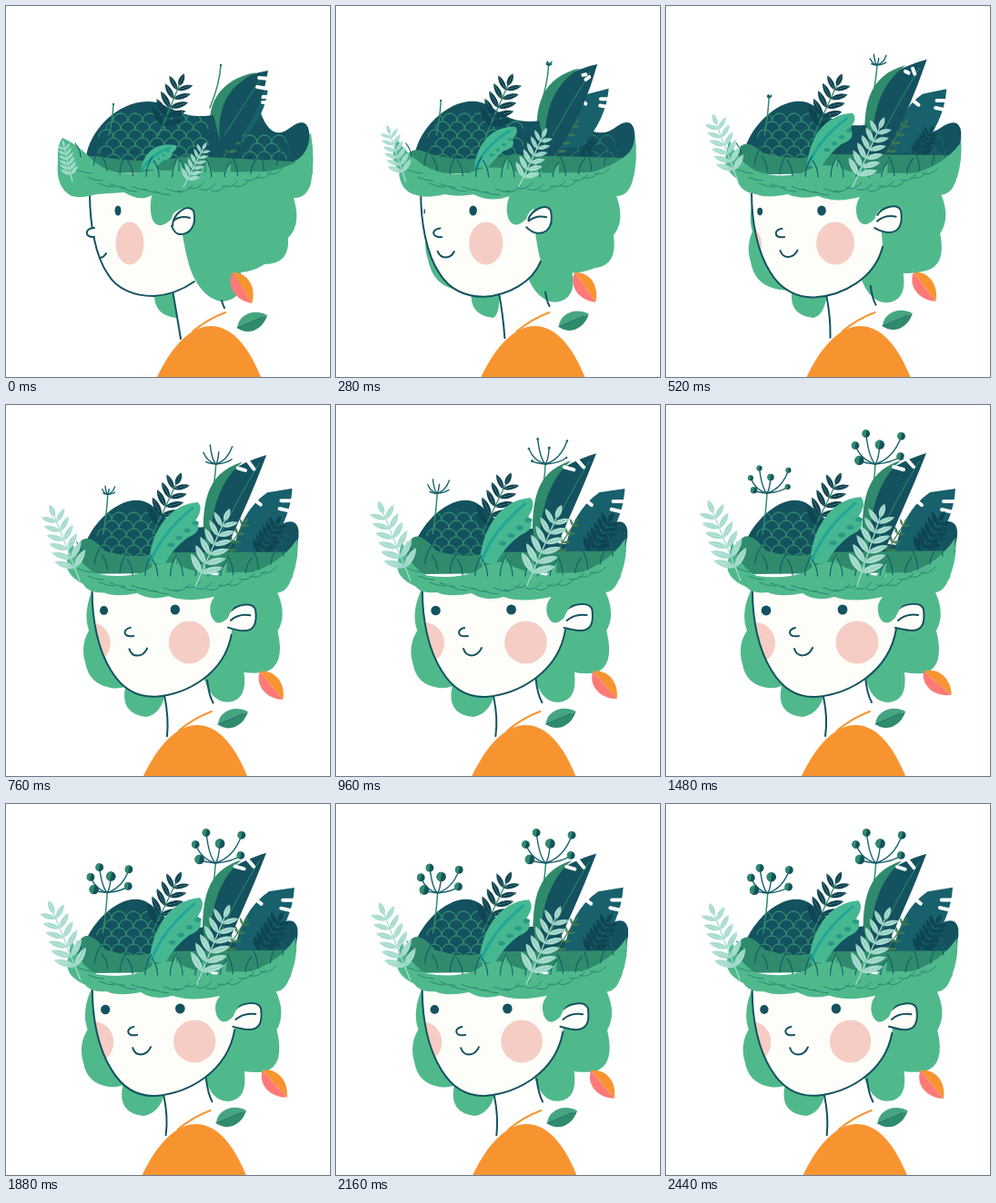
Recreate the animation shown at these times as an HTML page with a canvas. Size 356x408 px, loop 2480 ms.

```html
<!DOCTYPE html>
<html lang="en">
<head>
<meta charset="utf-8">
<title>Garden hair</title>
<style>
html, body { margin: 0; width: 100%; height: 100%; overflow: hidden; background: #fff; }
canvas { display: block; }
</style>
</head>
<body>
<canvas id="stage" width="356" height="408"></canvas>
<script>
const ctx = document.getElementById('stage').getContext('2d');
const LOOP = 2480, STEP = 40;
const HAIR = '#50b98c', MID = '#2f8b6c', DARK = '#14525f', DEEP = '#0f4450', TEAL = '#17606c',
  PALE = '#a8dccf', SKIN = '#fdfdf9', BLUSH = '#f5cdc4', ORANGE = '#f79430';
const NUMBER = /-?[\d.]+/g;
let time = 0, turn = 0, gust = 0;

function ramp(start, end) {
  const x = Math.min(1, Math.max(0, (time - start) / (end - start)));
  return x * x * (3 - 2 * x);
}

// Blend from the profile pose to the facing pose
const mix = (a, b) => a + (b - a) * turn;
function morph(a, b) {
  const target = b.match(NUMBER);
  let i = 0;
  return new Path2D(a.replace(NUMBER, n => mix(+n, +target[i++])));
}

function fill(path, color) { ctx.fillStyle = color; ctx.fill(path); }
function line(path, color = DARK, width = 2) {
  ctx.strokeStyle = color;
  ctx.lineWidth = width;
  ctx.stroke(path);
}
function clipped(path, draw) {
  ctx.save();
  ctx.clip(path);
  draw();
  ctx.restore();
}
function ellipse(x, y, rx, ry, color) {
  const p = new Path2D();
  p.ellipse(x, y, Math.max(0, rx), Math.max(0, ry), 0, 0, 7);
  fill(p, color);
}
function curve(x0, y0, cx, cy, x1, y1, color, width) {
  line(new Path2D(`M${x0} ${y0}Q${cx} ${cy} ${x1} ${y1}`), color, width);
}

function petal(x, y, angle, len, width, color, lower = color) {
  ctx.save();
  ctx.translate(x, y);
  ctx.rotate(angle);
  for (const [side, c] of [[-width, color], [width, lower]])
    fill(new Path2D(`M0 0C${len * .2} ${side} ${len * .7} ${side} ${len} 0Z`), c);
  ctx.restore();
}

function fern(bx, by, tx, ty, pairs, len, color, stem = color) {
  const dir = Math.atan2(ty - by, tx - bx);
  curve(bx, by, (bx + tx) / 2, (by + ty) / 2, tx, ty, stem, 1.3);
  for (let i = 0; i < pairs; i++) {
    const s = .2 + .72 * i / (pairs - 1), size = len * (1.1 - .35 * s);
    for (const side of [-.9, .9])
      petal(bx + (tx - bx) * s, by + (ty - by) * s, dir + side, size, size * .2, color);
  }
  petal(tx, ty, dir, len * .65, len * .17, color);
}

// Six stalks fan out from the hub, then the berries swell
const REACH = [18, 30, 35, 22, 42, 29];
function umbel(hx, hy, bx, by, scale, start) {
  const spread = scale * ramp(start, start + 1300), radius = 5 * ramp(start + 650, start + 1550);
  curve(bx, by, hx - 1, hy + 20, hx, hy, MID, 1.5);
  const tips = REACH.map((reach, i) => {
    const angle = (30 * i - 167) * Math.PI / 180;
    return [Math.cos(angle) * reach * spread, Math.sin(angle) * reach * spread];
  });
  for (const [dx, dy] of tips)
    curve(hx, hy, hx + dx * .7, hy + dy * .2, hx + dx, hy + dy, TEAL, 1.4);
  tips.forEach(([dx, dy], i) => {
    const size = radius * (i % 3 ? .87 : 1.05);
    ellipse(hx + dx, hy + dy, size, size, DARK);
    const half = new Path2D();
    half.arc(hx + dx, hy + dy, size, 1.8, 4.9);
    fill(half, MID);
  });
}

function scallops(path, x0, x1, y0) {
  clipped(path, () => {
    for (let row = 0; row < 6; row++)
      for (let x = x0 + row % 2 * 8; x < x1; x += 16) {
        const p = new Path2D();
        p.arc(x, y0 + row * 9, 8, Math.PI, 0);
        line(p, MID, 1.3);
      }
  });
}

function drawBody() {
  fill(morph(
    'M105 200Q107 228 107 248Q107 265 112 275Q117 300 135 310Q150 318 163 316Q162 340 187 343Q188 340 183 312L170 300L120 250Z',
    'M95 200Q81 228 89 248Q78 265 84 285Q88 308 112 311Q120 312 127 309Q120 340 150 343Q168 340 174 318L170 300L120 250Z'), HAIR);
  fill(morph('M183 300L183 313Q187 335 192 366L240 366L240 332L237 300Z',
    'M173 300L173 321Q178 345 175 364L226 364L226 327L219 300Z'), '#fff');
  line(morph('M183 313Q187 335 192 366', 'M173 321Q178 345 175 364'));
  ctx.save();
  ctx.translate(mix(0, -17), 0);
  fill(new Path2D('M166 408C181 376 202 352 225 352C249 352 267 376 280 408Z'), ORANGE);
  curve(205, 358, 222, 344, 241, 337, ORANGE, 2);
  ctx.restore();
}

function drawFace() {
  fill(morph(
    'M192 180L335 140Q340 170 335 195Q330 212 316 211Q325 240 310 255Q312 284 284 284Q272 292 258 293Q264 322 238 325Q208 322 194 262Q192 250 190 240Z',
    'M240 180L318 140Q321 168 311 190Q306 205 296 206Q307 230 297 248Q307 288 284 295Q272 296 262 294Q266 325 245 327Q226 328 219 300Q245 280 252 240Z'), HAIR);
  line(morph('M237 324Q238 328 240 332', 'M219 300Q221 318 226 327'));

  const outline = [
    'M92 205C92 240 98 275 112 295C122 312 142 319 162 319C182 318 197 310 207 303',
    'M95 205C95 235 101 268 116 292C128 312 145 322 165 321C200 318 245 295 253 246'];
  const face = morph(outline[0] + 'Q195 270 192 235L200 190L92 190Z',
    outline[1] + 'Q256 235 257 222L240 190L95 190Z');
  fill(face, SKIN);
  clipped(face, () => {
    ellipse(mix(52, 98), 262, 22, 23, BLUSH);
    line(morph('M93 271C97 279 106 279 110 272', 'M141 268C144 278 156 278 161 267'));
  });
  ellipse(mix(136, 210), 261, mix(15.5, 23.5), 23.5, BLUSH);
  line(morph(...outline));

  const nose = morph('M97 244C86 244 86 255 97 254', 'M142 245C133 247 134 256 146 254');
  fill(nose, SKIN);
  line(nose);
  ellipse(mix(89, 110), 226, mix(-2.2, 5.4), mix(1.5, 5.4), DARK);
  ellipse(mix(123, 194), 225, mix(3.5, 5.4), 5.5, DARK);

  const ear = morph('M183 242C183 230 198 216 206 225C210 240 203 252 190 251C186 250 184 247 182 242',
    'M256 224C262 219 280 215 283 225C285 241 281 248 270 248C264 248 257 246 252 245');
  fill(ear, SKIN);
  line(ear);
  line(morph('M184 236Q192 230 202 233', 'M255 237Q264 229 277 231'));
}

function drawFoliage() {
  umbel(mix(236, 230), 65, 224, 112, 1, 0);

  const mound = morph('M215 175L232 112L280 118Q292 150 312 134Q330 120 333 138Q336 170 300 176Z',
    'M212 175L222 150L262 155Q290 140 303 130Q318 124 320 138Q322 165 290 175Z');
  fill(mound, DARK);
  ctx.globalAlpha = 1 - turn;
  scallops(mound, mix(268, 262), 302, 150);
  ctx.globalAlpha = 1;

  fill(morph('M240 150Q245 110 265 98L288 90Q285 120 262 145Z', 'M250 168Q258 118 290 96L318 92Q316 130 285 168Z'), TEAL);
  line(morph('M288 100L282 100M286 106L282 106M268 104L270 106',
    'M320 106L305 106M316 118L303 115M272 103L281 110'), '#fff', 4);
  fern(238, 168, 262, 130, 4, 11, '#3f7a4f');
  fern(mix(268, 275), 172, mix(268, 300), mix(165, 128), 6, mix(2, 20), DEEP);

  fill(morph('M228 150C215 110 235 80 288 71L284 90Q270 135 245 160Z',
    'M216 165C215 110 215 75 286 53L273 85Q258 120 238 165Z'), DARK);
  fill(morph('M228 150C215 110 235 80 275 73C240 90 232 115 235 150Z',
    'M216 165C215 110 215 75 258 61C227 88 224 130 222 165Z'), MID);
  line(morph('M240 142Q262 108 280 80', 'M234 145Q252 105 278 62'), MID, 1);
  line(morph('M290 80L278 79M288 91L276 89', 'M250 68L261 71M263 58L272 68'), '#fff', 4);

  const bush = morph('M88 168C90 135 130 98 165 106C185 112 195 125 228 120L240 170Q160 185 88 168Z',
    'M84 160C92 130 125 98 150 106C168 112 175 140 216 136L220 170Q130 176 84 160Z');
  fill(bush, DARK);
  scallops(bush, mix(110, 108), mix(220, 162), 126);
  fern(mix(168, 160), 142, mix(190, 186), 88, 5, 23, DEEP, MID);
  umbel(mix(118, 111), mix(108, 97), mix(113, 106), 142, .83, 260);

  fill(morph('M75 180Q75 165 100 165Q150 175 200 165L335 172L310 182L95 184Z',
    'M74 175Q80 122 110 160Q140 170 168 162L318 160L290 184L95 186Z'), MID);
  fill(morph('M148 180C152 160 165 150 186 153Q190 156 182 162Q184 168 172 170Q166 176 162 180Z',
    'M158 174C160 140 178 104 214 101Q221 108 212 122Q222 135 203 143Q186 155 176 174Z'), '#45b892');
  line(morph('M149 180Q160 163 180 156', 'M160 172Q172 138 208 108'), '#22a69a', 3);
  for (let s = .25; s <= 1; s += .25)
    ellipse(mix(158, 174) + s * mix(20, 38), mix(176, 160) - s * mix(16, 34), mix(1.5, 4), mix(1.2, 2.6), '#2a9a86');
}

function drawGround() {
  fill(morph(
    'M62 145Q75 150 92 166Q110 186 140 184Q165 178 190 182Q230 192 270 184Q310 182 336 160L337 185Q300 195 255 192L195 222Q182 226 182 234Q168 248 161 235Q157 225 160 208Q148 216 130 205Q112 206 100 207Q82 212 72 209Q54 200 57 170Q56 152 62 145Z',
    'M73 146Q76 175 100 188Q130 192 152 184Q178 165 195 178Q215 186 245 190Q295 182 318 146L312 190Q300 205 285 212L262 218Q256 224 252 234Q240 246 234 232Q230 220 238 211Q205 218 185 211Q165 217 150 207Q125 212 112 206Q95 208 88 200Q64 190 68 172Q66 155 73 146Z'), HAIR);

  // Grass blades, then combed strands along the fringe
  const left = mix(82, 84), width = mix(230, 220);
  for (let i = 0; i < 17; i++) {
    const k = i / 16, x = left + width * k, lean = i % 2 ? 7 : -6, h = 15 + i * 5 % 9;
    const y = 188 - 22 * Math.abs(2 * k - 1) ** 4;
    if (i > 5 && i < 12) fill(new Path2D(`M${x - 6} ${y + 3}L${x + lean} ${y - h}L${x + 6} ${y + 3}Z`), HAIR);
    curve(x, y, x, y - h * .5, x + lean, y - h, TEAL, 1.2);
  }
  for (let i = 0; i < 18; i++) {
    const k = i / 17, x = left - 5 + (width - 20) * k;
    const y = 200 - 20 * Math.abs(2 * k - 1) ** 3 + i * 7 % 5;
    curve(x, y, x + 9, y + 4, x + 17, y + (k < .5 ? 4 : -6), '#2d8670', 1);
  }

  fern(mix(73, 82), 193, mix(64, 52), mix(155, 119), 6, mix(12, 24), PALE);
  fern(mix(195, 210), 199, mix(216, 243) - 8 * gust, mix(158, 124), 6, mix(14, 25), PALE);
}

function drawLooseLeaves() {
  const rad = Math.PI / 180;
  petal(mix(249, 283), 293, (mix(58, 50) - 10 * gust) * rad, 40, 14, ORANGE, '#ff7a76');
  const x = mix(254, 230), y = mix(354, 351), angle = -23 * rad;
  petal(x, y, angle, 36, 13, '#45a57f', MID);
  curve(x, y, x + 10 * Math.cos(angle), y + 10 * Math.sin(angle),
    x + 30 * Math.cos(angle), y + 30 * Math.sin(angle), TEAL, .8);
}

function frame(now) {
  time = Math.floor(now % LOOP / STEP) * STEP;
  turn = Math.sin(Math.PI / 2 * Math.min(1, time / 1100)) - .1 * ramp(1480, 2440);
  gust = Math.exp(-(((time - 1480) / 350) ** 2));
  ctx.clearRect(0, 0, 356, 408);
  ctx.lineCap = ctx.lineJoin = 'round';
  drawBody();
  drawFace();
  drawFoliage();
  drawGround();
  drawLooseLeaves();
  requestAnimationFrame(frame);
}
requestAnimationFrame(frame);
</script>
</body>
</html>
```
